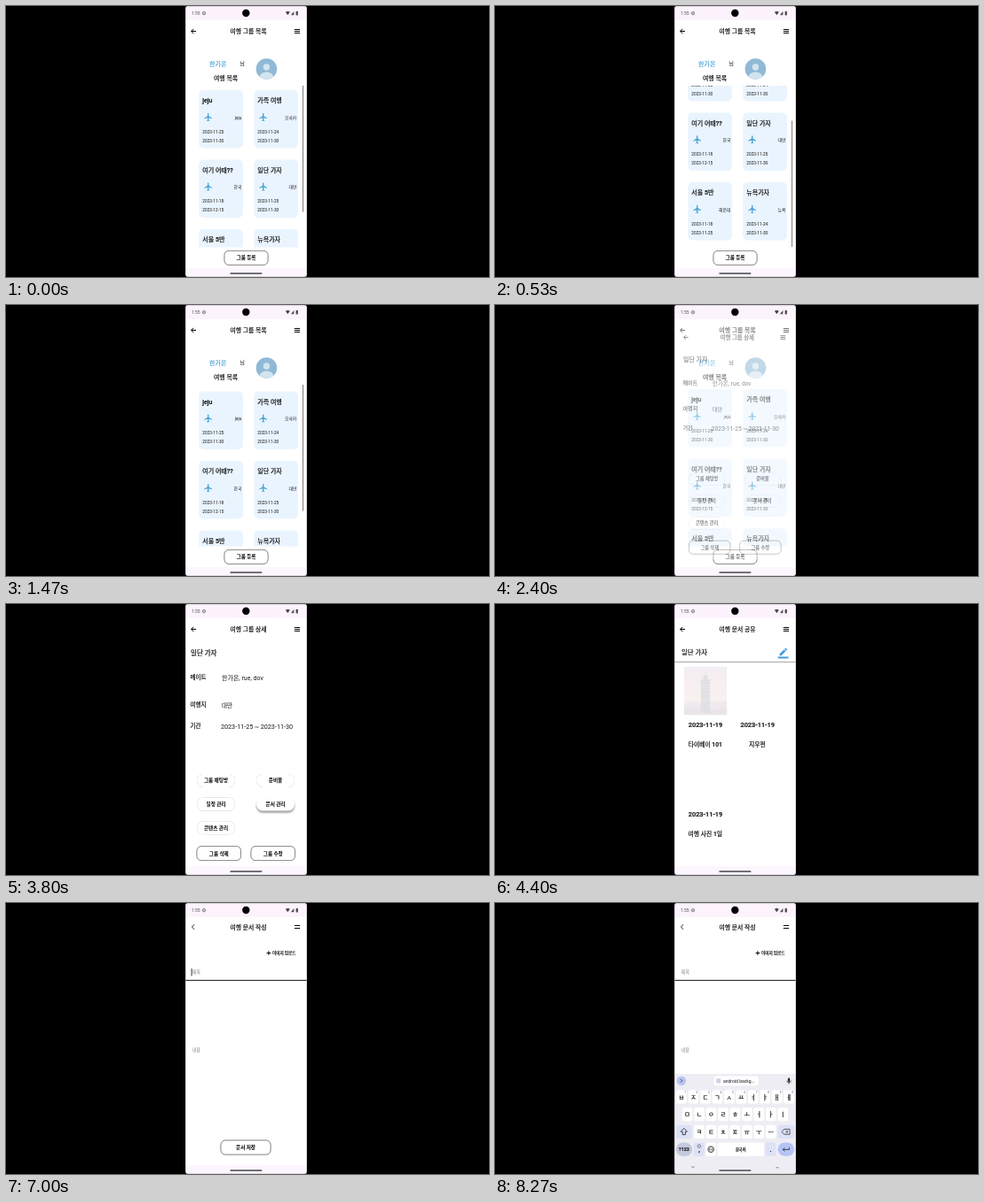
Recreate the animation shown at these times as an HTML page. Size 544x306 px, loop 8340 ms.

```html
<!DOCTYPE html>
<html lang="ko">
<head>
<meta charset="utf-8">
<title>여행 그룹</title>
<style>
  html, body { margin: 0; width: 100%; height: 100%; overflow: hidden; background: #000; }
  svg { display: block; }
  #stage { width: 100%; height: 100%; }
  text { font-family: Roboto, "Noto Sans CJK KR", "Noto Sans CJK", sans-serif; white-space: pre; }
  .medium { stroke: currentColor; stroke-width: .22px; }
  .raised { filter: drop-shadow(0 .9px .7px rgba(0, 0, 0, .38)); }
  .lifted { filter: drop-shadow(0 2.2px 1.2px rgba(0, 0, 0, .42)); }
</style>
</head>
<body>
<svg id="stage" viewBox="0 0 544 306"></svg>
<script>
const LOOP = 8340;
const INK = '#161616';
const BLUE = '#4ba3d3';

// ---- drawing helpers: y is the optical middle of the text ----
const text = (s, x, y, size, { fill = INK, weight = 400, anchor = 'start' } = {}) =>
  `<text x="${x}" y="${y + size * 0.36}" font-size="${size}" fill="${fill}" color="${fill}" font-weight="${weight}" text-anchor="${anchor}"${weight === 500 ? ' class="medium"' : ''}>${s}</text>`;
const mid = (s, x, y, size, opt = {}) => text(s, x, y, size, { ...opt, anchor: 'middle' });
const rect = (x, y, w, h, fill, r = 0, extra = '') =>
  `<rect x="${x}" y="${y}" width="${w}" height="${h}" rx="${r}" fill="${fill}" ${extra}/>`;
const circle = (x, y, r, fill, extra = '') => `<circle cx="${x}" cy="${y}" r="${r}" fill="${fill}" ${extra}/>`;
const line = (d, color = '#111', w = 1, extra = '') =>
  `<path d="${d}" fill="none" stroke="${color}" stroke-width="${w}" ${extra}/>`;
const icon = (d, x, y, scale, fill) =>
  `<path d="${d}" fill="${fill}" transform="translate(${x} ${y}) scale(${scale})"/>`;
const group = (id, body, extra = '') => `<g id="${id}" ${extra}>${body}</g>`;

const PLANE = 'M21 16v-2l-8-5V3.5c0-.83-.67-1.5-1.5-1.5S10 2.67 10 3.5V9l-8 5v2l8-2.5V19l-2 1.5V22l3.5-1 3.5 1v-1.5L13 19v-5.5z';
const PENCIL = 'M17.75 7L14 3.25l-10 10V17h3.75zm2.96-2.96c.39-.39.39-1.02 0-1.41L18.37.29c-.39-.39-1.02-.39-1.41 0L15 2.25 18.75 6zM0 20h24v4H0z';

const button = (label, x, y, w, h = 16) =>
  rect(x, y, w, h, '#fff', 5, 'class="raised" stroke="#6a6a6a" stroke-width=".7"') +
  mid(label, x + w / 2, y + h / 2, 5.6, { weight: 700, fill: '#000' });

const pill = (label, x, y, extra = '') =>
  rect(x, y, 43, 15, '#fff', 7.5, `class="raised" ${extra}`) +
  mid(label, x + 21.5, y + 7.3, 5.6, { weight: 700, fill: '#000' });

const appBar = title =>
  rect(202, 16, 137, 280, '#fff') +
  line('M214 28.5H208.8M211.3 25.9L208.7 28.5L211.3 31.1', '#000', 1) +
  line('M324.8 26.5h6.2M324.8 28.5h6.2M324.8 30.5h6.2', '#000', 1) +
  mid(title, 273, 28.5, 6.8, { weight: 500 });

// ---- group list ----
const trips = [
  ['jeju', 'jeju', '2023-11-25', '2023-11-30'],
  ['가족 여행', '오사카', '2023-11-24', '2023-11-30'],
  ['여기 어때??', '한국', '2023-11-18', '2023-12-15'],
  ['일단 가자', '대만', '2023-11-25', '2023-11-30'],
  ['서울 5반', '해운대', '2023-11-18', '2023-11-25'],
  ['뉴욕가자', '뉴욕', '2023-11-24', '2023-11-30'],
];
const card = ([name, place, from, to], i) => {
  const x = 217.3 + (i % 2) * 62, y = 95 + Math.floor(i / 2) * 78.5;
  return rect(x, y, 49.6, 65.5, '#e9f4fe', 5) +
    text(name, x + 4, y + 11.8, 7, { weight: 500 }) +
    icon(PLANE, x + 5.1, y + 25, 0.46, BLUE) +
    text(place, x + 48, y + 31, 4.8, { anchor: 'end' }) +
    text(from, x + 4, y + 47, 4.75) +
    text(to, x + 4, y + 57, 4.75);
};
const avatar =
  `<clipPath id="face"><circle cx="293.4" cy="71" r="11.8"/></clipPath>` +
  circle(293.4, 71, 11.8, '#8fb9d6') +
  `<g clip-path="url(#face)" fill="#d3e4ef"><circle cx="293.4" cy="69" r="3.7"/><ellipse cx="293.4" cy="80" rx="7.6" ry="5.6"/></g>`;

const listPage = appBar('여행 그룹 목록') +
  text('한가온', 229, 65, 7, { fill: '#55a8d8', weight: 500 }) +
  text('님', 263.3, 64.4, 6.2) + text('여행 목록', 234, 82, 6.9, { weight: 500 }) + avatar +
  `<clipPath id="view"><rect x="202" y="90" width="137" height="182.5"/></clipPath>` +
  `<g clip-path="url(#view)">${group('cards', trips.map(card).join(''))}</g>` +
  rect(334, 90, 1, 142.5, '#7c7c7c', 0, 'id="thumb"') +
  button('그룹 등록', 246, 276.4, 49);

// ---- group detail ----
const detailPage = appBar('여행 그룹 상세') +
  text('일단 가자', 208, 55.5, 7.5, { weight: 500 }) +
  text('메이트', 207.5, 83, 6.5, { weight: 500 }) + text('한가온, rue, dov', 243, 83.7, 7) +
  text('여행지', 207.5, 114, 6.5, { weight: 500 }) + text('대만', 243, 115, 6.6) +
  text('기간', 207.5, 137.5, 6.5, { weight: 500 }) + text('2023-11-25 ~ 2023-11-30', 242, 138, 7.2) +
  pill('그룹 채팅방', 215, 192) + pill('준비물', 282, 192) + pill('일정 관리', 215, 218.6) +
  pill('문서 관리', 282, 218.6, 'id="press"') + pill('콘텐츠 관리', 215, 245.2) +
  button('그룹 삭제', 215, 273.6, 49.5) + button('그룹 수정', 276, 273.6, 49.5);

// ---- shared documents ----
const gradient = (id, stops) =>
  `<linearGradient id="${id}" x1="0" y1="0" x2="0" y2="1">` +
  stops.map((c, i) => `<stop offset="${i / (stops.length - 1)}" stop-color="${c}"/>`).join('') + `</linearGradient>`;

const frame = (x, y, body) => `<svg class="photo" x="${x}" y="${y}" width="48.5" height="54.8" viewBox="0 0 48.5 54.5">${body}</svg>`;

const tower = () => {
  let s = rect(0, 0, 48.5, 54.5, 'url(#dusk)') +
    `<path d="M0 42L9 39L18 41L31 39L40 40L48.5 38V54.5H0Z" fill="#a58a9b"/>` +
    `<path d="M0 48L12 46L30 49L48.5 46V54.5H0Z" fill="#8a7080"/>` +
    rect(23.8, 4, 0.9, 8, '#5d5c70') + rect(21.7, 10, 5, 5, '#5d5c70');
  for (let i = 0; i < 8; i++) {
    const y = 14.4 + i * 3.2;
    s += `<path d="M18.7 ${y}H29.7L28.9 ${y + 3}H19.5Z" fill="#55576b"/>`;
  }
  return s + `<path d="M19.6 39.5H28.8L30 52H18.4Z" fill="#56566a"/>`;
};

const village = sky => {
  let seed = 7;
  const rnd = () => (seed = (seed * 16807) % 2147483647) / 2147483647;
  const gold = ['#f3bd3f', '#dd8f2a', '#8a5a2c', '#efd56a', '#b98a32', '#6d5a35'];
  const dim = ['#3d4650', '#5c5f66', '#7a5638', '#2d3836', '#c98a3a', '#474b4a'];
  let s = rect(0, 0, 48.5, 54.5, `url(#${sky})`) +
    `<path d="M0 17L8 13L18 7L27 14L37 17L48.5 14V54.5H0Z" fill="#27433f"/>` +
    `<path d="M0 25L14 21L32 20L48.5 18V54.5H0Z" fill="#4f4a45"/>` +
    `<path d="M13 29L30 24L48.5 30V54.5H23L8 42Z" fill="#a07530"/>`;
  for (let i = 0; i < 150; i++) {
    const x = rnd() * 48, y = 20 + rnd() * 34;
    const lit = y > 26 && y - 36 < x * 0.8 && x > 9;
    s += rect(x, y, 1.5 + rnd() * 4, 0.8 + rnd() * 1.4, (lit ? gold : dim)[i % 6], 0,
      `transform="rotate(${-30 + rnd() * 55} ${x} ${y})"`);
  }
  return s + `<path d="M0 40L9 45L17 54.5H0Z" fill="#2f4030"/>`;
};

const doc = (body, x, y, caption) =>
  frame(x, y, body) +
  mid('2023-11-19', x + 24.2, y + 65.8, 7.4, { weight: 500 }) +
  mid(caption, x + 24, y + 88, 6.8, { weight: 500 });

const docsPage = appBar('여행 문서 공유') +
  text('일단 가자', 210, 54.5, 7.4, { weight: 500 }) + icon(PENCIL, 318.7, 49.8, 0.49, '#3f9bdf') +
  rect(202, 65, 137, 1, '#a8a8a8') +
  doc(tower(), 212.8, 70.6, '타이베이 101') +
  doc(village('plum'), 271.5, 70.6, '지우펀') +
  doc(village('night'), 212.8, 171.2, '여행 사진 1일');

// ---- new document ----
const HINT = { fill: '#858585' };
const writePage = rect(202, 16, 137, 280, '#fff') +
  line('M212.2 24.3L209.4 27L212.2 29.7', '#222', 1) +
  line('M324.8 25.5h6.2M324.8 28.5h6.2', '#000', 1) +
  mid('여행 문서 작성', 273, 27.2, 6.8, { weight: 500 }) +
  line('M293.6 56.5h4.6M295.9 54.2v4.6', '#000', 1) +
  text('이미지 업로드', 300, 56.5, 4.6, { weight: 500 }) +
  text('제목', 209.6, 78, 5.2, HINT) +
  rect(208.6, 74, 0.9, 8.4, '#222', 0, 'id="caret"') +
  rect(202, 86.8, 137, 1.1, '#222') +
  text('내용', 209.6, 166.6, 5.2, HINT) +
  button('문서 저장', 242, 268, 56);

// ---- keyboard ----
const key = (ch, x, y, w = 11.6, fill = '#fff', size = 7, r = 2) =>
  rect(x - w / 2, y - 7.6, w, 15.2, fill, r) + mid(ch, x, y + 0.2, size, { weight: 500 });
const row = (chars, x, y) => [...chars].map((c, i) => key(c, x + i * 13.45, y)).join('');

const keyboard = rect(202, 193, 137, 113, '#eeedf3') +
  circle(209.9, 200.8, 5.2, '#b9c4f4') + line('M209 198.9L210.9 200.8L209 202.7', '#333', 0.8) +
  rect(246.6, 195.6, 50, 10.6, '#fff', 3) + rect(249.2, 198.3, 5, 5.2, '#ccd2e8', 1) +
  text('android.backg...', 257, 201, 5) +
  rect(329.9, 197.4, 2.2, 4.6, '#222', 1.1) + line('M328.8 200.6a2.2 2.2 0 0 0 4.4 0M331 202.8v1.6', '#222', 0.7) +
  row('ㅂㅈㄷㄱㅅㅛㅕㅑㅐㅔ', 210, 218.8) +
  [...'1234567890'].map((n, i) => mid(n, 214 + i * 13.45, 213.6, 3, { fill: '#555' })).join('') +
  row('ㅁㄴㅇㄹㅎㅗㅓㅏㅣ', 216.6, 238.6) +
  key('', 212.8, 258.3, 17.6, '#dde1f6') +
  line('M209.2 258.2L212.8 254.3L216.4 258.2H214.4V261.6H211.2V258.2Z', '#222', 0.8) +
  row('ㅋㅌㅊㅍㅠㅜㅡ', 230, 258.3) +
  key('', 327.8, 258.3, 18.6, '#dde1f6') +
  line('M323 258.3L325.6 255.4H332V261.2H325.6ZM327.4 257l2.6 2.6M330 257l-2.6 2.6', '#222', 0.7) +
  key('?123', 213, 278.2, 18.4, '#c5c9de', 5.4, 7.6) +
  key(',', 229.9, 278.2, 12, '#dde1f6') + circle(229.9, 274.6, 1.7, 'none', 'stroke="#333" stroke-width=".6"') +
  key('', 243.2, 278.2) + circle(243.2, 278.2, 3.4, 'none', 'stroke="#222" stroke-width=".7"') +
  line('M239.8 278.2h6.8M243.2 274.8c-2.2 2-2.2 4.8 0 6.8c2.2-2 2.2-4.8 0-6.8', '#222', 0.5) +
  key('한국어', 276.8, 278.2, 52.4, '#fff', 4.2) +
  key('.', 310.5, 278.2, 11.4, '#dde1f6') +
  key('', 327.8, 278.2, 18.6, '#b6c3f6', 7, 7.6) +
  line('M331.4 276v2.4H324.4M326.3 276.4L324.3 278.4L326.3 280.4', '#222', 0.8) +
  line('M221.2 297.2L223 299L224.8 297.2', '#666', 0.7) +
  line('M316.2 298.8h3.6', '#777', 0.8);

// ---- phone ----
const statusBar = rect(202, 0, 137, 16, '#fcf3fd') +
  text('1:55', 209, 8.4, 5, { fill: '#555' }) +
  circle(223, 8.2, 1.7, 'none', 'stroke="#666" stroke-width=".8"') + circle(223, 8.2, 0.6, '#666') +
  circle(270.3, 8, 4.2, '#000') +
  `<path d="M314.8 6.8Q317.3 5 319.8 6.8L317.3 10.2Z" fill="#444"/>` +
  `<path d="M324.4 6V10.2H320.8Z" fill="#555"/>` + rect(326.6, 5.9, 2.2, 4.5, '#444', 0.5);

const stage = document.getElementById('stage');
stage.innerHTML = `<defs>
  ${gradient('dusk', ['#b9a3bd', '#d8a5ad', '#e0b3ad', '#a98a9c'])}
  ${gradient('plum', ['#4b5a92', '#8b7aa5', '#b98f96', '#4a4538'])}
  ${gradient('night', ['#1f568f', '#3b76ac', '#4f6f8a', '#3a3c34'])}
  <clipPath id="phone"><rect x="202" y="0" width="137" height="306" rx="3.5"/></clipPath>
  <clipPath id="body"><rect x="202" y="16" width="137" height="280"/></clipPath></defs>
  <rect width="544" height="306"/>
  <g clip-path="url(#phone)">${rect(202, 0, 137, 306, '#fcf6fe')}
    <g clip-path="url(#body)">${rect(202, 16, 137, 280, '#fff')}
      ${group('list', listPage)}${group('detail', detailPage)}${group('docs', docsPage)}${group('write', writePage)}
    </g>
    ${statusBar}${group('keys', keyboard)}${rect(252.3, 301, 36.2, 1.9, '#727077', 0.9)}
    ${rect(202, 0, 137, 306, 'none', 3.5, 'stroke="#b4b0b6" stroke-width="1"')}
  </g>`;

// ---- motion ----
const $ = id => document.getElementById(id);
const el = {};
for (const id of ['list', 'detail', 'docs', 'write', 'cards', 'thumb', 'press', 'caret', 'keys']) el[id] = $(id);
const photos = [...document.querySelectorAll('.photo')];

const at = (t, steps) => {
  if (t <= steps[0][0]) return steps[0][1];
  for (let i = 1; i < steps.length; i++) {
    const [t0, v0] = steps[i - 1], [t1, v1] = steps[i];
    if (t < t1) return v0 + (v1 - v0) * (t - t0) / (t1 - t0);
  }
  return steps[steps.length - 1][1];
};
const SCROLL = [[400, 0], [470, 24], [530, 53], [600, 54], [730, 52.5], [800, 52.5], [870, 38], [930, 15],
  [1000, 4], [1070, 0], [1200, 0], [1400, -2.5], [1470, -2.5], [1670, 0]];
const THUMB = [[130, 1], [330, 0], [400, 0], [470, 1], [1600, 1], [1870, 0]];
const KEYS = [[7330, 0], [7400, 0.45], [7470, 0.85], [7600, 1]];

const enter = (page, t, start) => {
  const p = at(t, [[start - 67, 0], [start + 200, 1]]);
  const scale = 1 - 0.15 * (1 - p) ** 3;
  page.setAttribute('opacity', Math.min(1, p * 1.8));
  page.setAttribute('transform', `translate(270.5 156) scale(${scale}) translate(-270.5 -156)`);
  page.style.display = p > 0 ? '' : 'none';
};

function draw(time) {
  const t = Math.floor((time + 3.4) * 0.015) / 0.015;
  const offset = at(t, SCROLL);
  el.cards.setAttribute('transform', `translate(0 ${-offset})`);
  el.thumb.setAttribute('y', 90 + Math.min(52.5, Math.max(0, offset)) * 39.5 / 52.5);
  el.thumb.setAttribute('opacity', at(t, THUMB));

  enter(el.detail, t, 2400);
  enter(el.docs, t, 4000);
  enter(el.write, t, 5870);
  el.press.setAttribute('class', t >= 3795 ? 'lifted' : 'raised');
  photos.forEach((p, i) => p.setAttribute('opacity', at(t, [[4330 + i * 200, 0], [4730 + i * 200, 1]])));

  const caret = (t >= 6995 && t < 7795) || (t >= 7995 && t < 8195);
  el.caret.style.display = caret ? '' : 'none';
  const up = at(t, KEYS);
  el.keys.setAttribute('transform', `translate(0 ${113 * (1 - up)})`);
  el.keys.style.display = up > 0 ? '' : 'none';
}

const begin = performance.now();
function tick() {
  draw((performance.now() - begin) % LOOP);
  requestAnimationFrame(tick);
}
draw(0);
requestAnimationFrame(tick);
</script>
</body>
</html>
```
